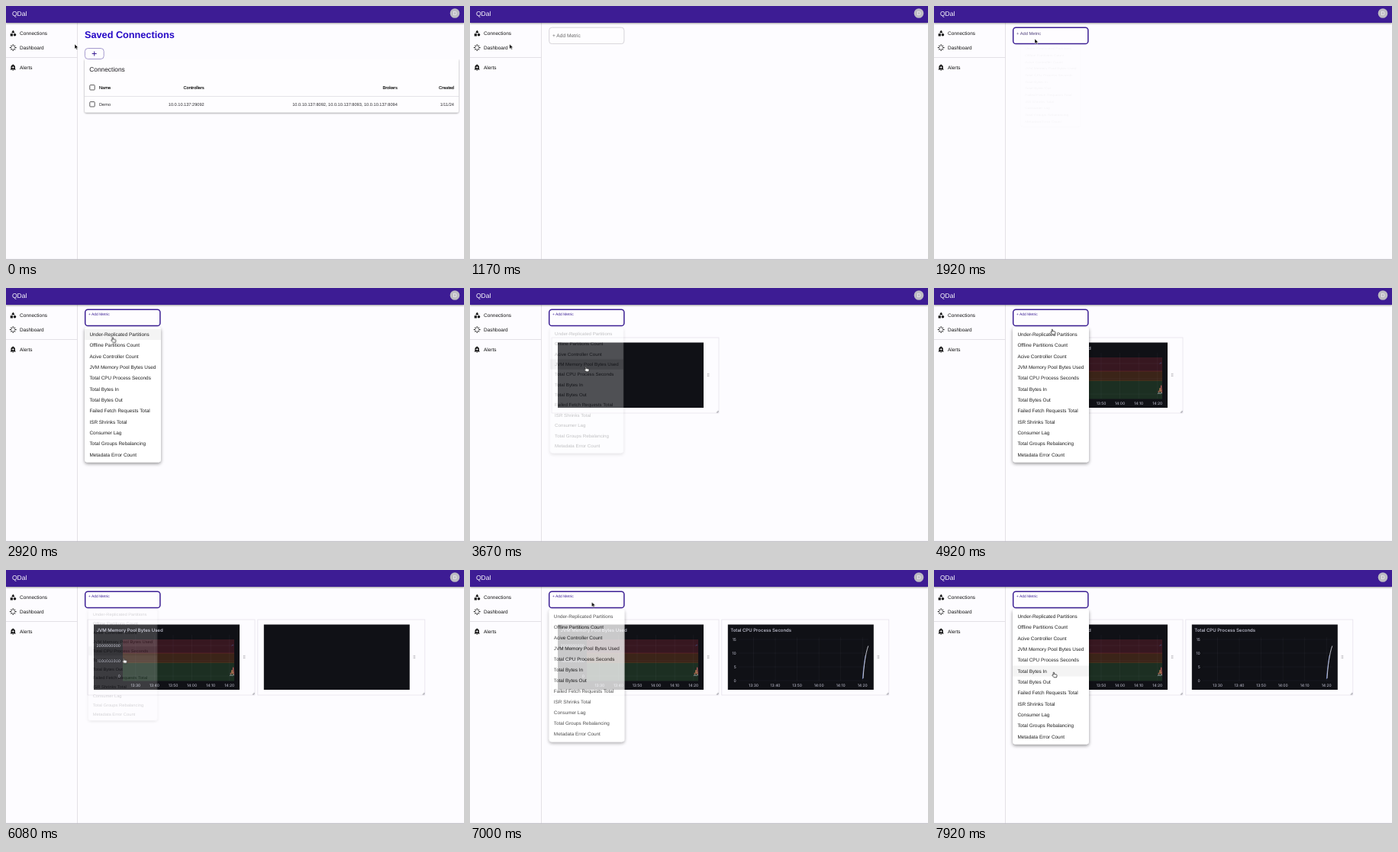
Write an HTML page that moves like this. It is 600 px wide and 333 px high and loops after 8000 ms.

```html
<!DOCTYPE html>
<html lang="en">
<head>
<meta charset="utf-8">
<title>Broker dashboard</title>
<style>
html, body { margin: 0; width: 100%; height: 100%; overflow: hidden; background: #fdfcff; }
svg { display: block; width: 600px; height: 333px; font-family: "Liberation Sans", Arial, sans-serif; text-rendering: geometricPrecision; }
.end { text-anchor: end; }
.mid { text-anchor: middle; }
.chart { font-family: Inter, sans-serif; font-size: 5px; fill: #ccccdc; }
.chart .title { font-size: 6px; font-weight: 500; }

/* One 8 s loop: 1% = 80 ms */
.home, .board, .panel, .plot, .hover, .hand, .arrow { animation: 8s step-end infinite; }
.home { animation-name: leave; }
.board { animation-name: enter; }
.focus { animation: focus 8s step-end infinite; }
.label { animation: shrink 8s cubic-bezier(0, 0, .2, 1) infinite; }
.fade { animation: fade 8s cubic-bezier(.4, 0, .2, 1) infinite; }
.grow { animation: grow 8s cubic-bezier(.4, 0, .2, 1) infinite; transform-origin: 153px 48px; }
.hover { animation-name: hover; }
.cursor { animation: move 8s linear infinite; }
.hand { animation-name: hand; }
.arrow { animation-name: arrow; }
#panel1 { animation-name: panel1; }
#panel1 .plot { animation-name: plot1; }
#panel2 { animation-name: panel2; }
#panel2 .plot { animation-name: plot2; }

@keyframes leave { 0% { opacity: 1 } 12.5%, 100% { opacity: 0 } }
@keyframes enter { 0% { opacity: 0 } 12.5%, 100% { opacity: 1 } }
@keyframes panel1 { 0% { opacity: 0 } 44.6%, 100% { opacity: 1 } }
@keyframes plot1 { 0% { opacity: 0 } 52.1%, 100% { opacity: 1 } }
@keyframes panel2 { 0% { opacity: 0 } 74.4%, 100% { opacity: 1 } }
@keyframes plot2 { 0% { opacity: 0 } 82.5%, 100% { opacity: 1 } }
@keyframes focus {
  0% { stroke: #c4c2c9; stroke-width: .7px }
  23.4%, 100% { stroke: #3c1f94; stroke-width: 1.5px }
}
@keyframes shrink {
  0%, 23.5% { transform: translate(108px, 41px); fill: #666 }
  26%, 100% { transform: translate(108px, 35.8px) scale(.75); fill: #3c1f94 }
}
@keyframes fade {
  0%, 23.6%, 47.7%, 54.6%, 77.6%, 85.8% { opacity: 0 }
  27%, 44.3%, 58%, 74.2%, 89.2%, 100% { opacity: 1 }
}
@keyframes grow {
  0%, 23.6%, 47.7%, 54.6%, 77.6%, 85.8% { transform: scale(.75, .5625) }
  25.9%, 45.4%, 56.9%, 75.3%, 88.1%, 100% { transform: none }
}
@keyframes hover {
  0%, 48%, 78% { fill-opacity: 0; transform: none }
  34.7%, 61.6%, 93.2% { fill-opacity: .045; transform: none }
  37.1%, 63.7%, 94.2% { fill-opacity: .045; transform: translateY(14.32px) }
  39.4%, 65.8%, 95.3% { fill-opacity: .045; transform: translateY(28.64px) }
  41.7%, 68%, 96.3% { fill-opacity: .045; transform: translateY(42.96px) }
  44.3% { fill-opacity: .16; transform: translateY(42.96px) }
  70.2%, 97.3% { fill-opacity: .045; transform: translateY(57.28px) }
  74.2% { fill-opacity: .16; transform: translateY(57.28px) }
  98.4%, 100% { fill-opacity: .045; transform: translateY(71.6px) }
}
@keyframes move {
  0%, .9% { transform: translate(90px, 50px) }
  5.2%, 12.4% { transform: translate(27px, 52px) }
  21.9%, 33% { transform: translate(132px, 43px) }
  42.75%, 46.9% { transform: translate(151px, 103px) }
  53%, 60.5% { transform: translate(155px, 43px) }
  61.5% { transform: translate(154px, 54px) }
  70.9%, 77.3% { transform: translate(153.5px, 115.5px) }
  84%, 92.3% { transform: translate(159.5px, 42px) }
  99%, 100% { transform: translate(156px, 134px) }
}
@keyframes hand {
  0%, 14.5%, 47.6%, 78% { opacity: 0 }
  8.3%, 34.8%, 61.2%, 93.2%, 100% { opacity: 1 }
}
@keyframes arrow {
  0%, 14.5%, 47.6%, 78% { opacity: 1 }
  8.3%, 34.8%, 61.2%, 93.2%, 100% { opacity: 0 }
}
</style>
</head>
<body>
<svg viewBox="0 0 600 333">
  <defs>
    <filter id="soft" x="-20%" y="-20%" width="140%" height="150%">
      <feDropShadow dx="0" dy="1" stdDeviation="1" flood-opacity=".4"/>
    </filter>
    <filter id="deep" x="-20%" y="-20%" width="140%" height="140%">
      <feDropShadow dx="0" dy="2" stdDeviation="2.2" flood-opacity=".42"/>
    </filter>
  </defs>
  <rect width="600" height="333" fill="#fdfcff"/>

  <g class="home">
    <text x="103" y="42.2" font-size="12.7" font-weight="700" fill="#2508c6">Saved Connections</text>
    <rect x="103" y="69" width="490" height="70.5" rx="2" fill="#fefdff" filter="url(#soft)"/>
    <rect x="102" y="54" width="492" height="16" fill="#fdfcff"/>
    <rect x="103.4" y="55.5" width="24.8" height="14" rx="4" fill="#fefdff" stroke="#8f82c2" stroke-width=".8"/>
    <path d="M112.7 62.5h6M115.7 59.5v6" stroke="#3c1f94" stroke-width="1"/>
    <text x="109.2" y="85.8" font-size="8.4" fill="#1d1b20">Connections</text>
    <path d="M103 118.5H593" stroke="#dfdde3" stroke-width=".8"/>
    <g fill="none" stroke="#4a4a4a" stroke-width=".9">
      <rect x="109.8" y="103.6" width="6.4" height="6.4" rx=".8"/>
      <rect x="109.8" y="125.6" width="6.4" height="6.4" rx=".8"/>
    </g>
    <g id="table" font-size="5.63"></g>
  </g>

  <g class="board">
    <g id="panel1" class="panel">
      <g class="frame"></g>
      <g class="plot chart">
        <text class="title" x="118.5" y="80.7">JVM Memory Pool Bytes Used</text>
        <rect x="153" y="91" width="146" height="18" fill="#371720"/>
        <rect x="153" y="109" width="146" height="12.5" fill="#3b2418"/>
        <rect x="153" y="121.5" width="146" height="24" fill="#1c2f22"/>
        <path d="M153 109h146" stroke="#8a2b35" stroke-width=".4"/>
        <path d="M153 121.5h146" stroke="#7a4a20" stroke-width=".4"/>
        <g class="ticks"></g>
        <g fill="none" stroke-width=".7">
          <path d="M293 138.3l2-.6 1.4.8 1.2-1 1.4.4" stroke="#d9dbe6"/>
          <path d="M293.4 135.8l2.3-.8 1.2-1 .8-6.3 .9 9.3" stroke="#e0606c"/>
          <path d="M294.5 137l1.6-6 .8 5.5 1-3" stroke="#c98a5a"/>
          <path d="M295.5 99.2l2.5-1.2" stroke="#3f5390"/>
        </g>
      </g>
    </g>
    <g id="panel2" class="panel">
      <g class="frame" transform="translate(222.8)"></g>
      <g class="plot chart">
        <text class="title" x="341.3" y="80.7">Total CPU Process Seconds</text>
        <g class="ticks"></g>
        <path d="M514.3 143C515.2 132 516.4 121 518.2 112" fill="none" stroke="#5468ad" stroke-width="1"/>
        <path d="M515 142C516 126 518 110 521.7 99.5" fill="none" stroke="#d4d5de" stroke-width=".9"/>
      </g>
    </g>
    <rect class="focus" x="103.7" y="28.2" width="98.2" height="21.4" rx="3.6" fill="#fefdff"/>
    <text class="label" font-size="6.6">+ Add Metric</text>
    <g class="fade"><g class="grow">
      <rect x="103" y="51" width="100" height="177.6" rx="4" fill="#fff" filter="url(#deep)"/>
      <rect class="hover" x="103" y="53.7" width="100" height="14.3"/>
      <g id="menu" font-size="6.42" fill="#1f1f1f"></g>
    </g></g>
  </g>

  <path d="M93.5 22V332" stroke="#dcdae0" stroke-width=".8"/>
  <path d="M0 67.5H93" stroke="#dcdae0" stroke-width=".8"/>
  <g id="nav" font-size="6.48" fill="#111"></g>
  <path transform="translate(4.5 30.8) scale(.4)" fill="#111" d="M12 2l-5.5 9h11zM3 13.5h8v8H3zM13 17.5a4.5 4.5 0 1 0 9 0a4.5 4.5 0 1 0-9 0"/>
  <g id="rays" transform="translate(9.2 54.6)" stroke="#111" stroke-width="1.05"></g>
  <path transform="translate(4.4 75.6) scale(.4)" fill="#111" d="M10 21a2 2 0 0 0 4 0zM18.9 16.8V11c0-3.2-2.3-6-5.3-6.7v-.7a1.6 1.6 0 0 0-3.2 0v.7C7.4 5 5.1 7.8 5.1 11v5.8L3 18.9V20h18v-1.1zM16 13h-3v3h-2v-3H8v-2h3V8h2v3h3z"/>

  <rect width="600" height="22" fill="#3c1f94" filter="url(#soft)"/>
  <text x="8" y="13" font-size="8.5" fill="#fff">QDal</text>
  <circle cx="588" cy="9.5" r="6.3" fill="#bdbcc2"/>
  <text class="mid" x="588" y="12.1" font-size="7.2" fill="#f7f5fb">D</text>
  <rect y="331.8" width="600" height="1.2" fill="#c3c1c7"/>

  <g class="cursor">
    <path class="arrow" d="M0 0V6.3L1.5 5L2.5 7.2L3.6 6.7L2.6 4.6H4.6Z" fill="#000" stroke="#fff" stroke-width=".5"/>
    <path class="hand" d="M.2 .8C.2-.2 1.6-.2 1.6 .8V2.6L4.4 3.1Q5.2 3.3 5.1 4.2L4.6 6.8H1.2L-1 4.4C-1.5 3.6-.6 3.1 .2 3.9Z" fill="#fff" stroke="#111" stroke-width=".7"/>
  </g>
</svg>

<script>
const $ = s => document.querySelector(s);
const text = (x, y, s, attrs = "") => `<text x="${x}" y="${y}" ${attrs}>${s}</text>`;

$("#nav").innerHTML = [["Connections", 37.9], ["Dashboard", 57], ["Alerts", 82.8]]
  .map(([s, y]) => text(18, y, s)).join("");

$("#rays").innerHTML = Array.from({ length: 8 }, (_, i) =>
  `<path d="M${i % 2 ? 2.1 : 2} 0H${i % 2 ? 3.9 : 4.4}" transform="rotate(${i * 45})"/>`).join("");

const columns = [
  [122, "", "Name", "Demo"],
  [259.7, "end", "Controllers", "10.0.10.137:29092"],
  [512.8, "end", "Brokers", "10.0.10.137:8092, 10.0.10.137:8093, 10.0.10.137:8094"],
  [587, "end", "Created", "1/11/24"]
];
$("#table").innerHTML = columns.map(([x, align, head, cell]) =>
  text(x, 109, head, `class="${align}" fill="#000" stroke="#000" stroke-width=".12"`) +
  text(x, 131, cell, `class="${align}" fill="#2b2a2e"`)).join("");

const metrics = ["Under-Replicated Partitions", "Offline Partitions Count", "Acive Controller Count",
  "JVM Memory Pool Bytes Used", "Total CPU Process Seconds", "Total Bytes In", "Total Bytes Out",
  "Failed Fetch Requests Total", "ISR Shrinks Total", "Consumer Lag", "Total Groups Rebalancing",
  "Metadata Error Count"];
$("#menu").innerHTML = metrics.map((s, i) => text(109.4, 63.1 + 14.32 * i, s)).join("");

const dots = [0, 1, 2].map(i => `<path d="M310.9 ${112.4 + i * 1.6}h.8m.8 0h.8"/>`).join("");
const frame = `
  <rect x="107" y="65" width="219" height="99" fill="#fdfcff" stroke="#e3dfe9" stroke-width=".7"/>
  <rect x="115" y="71.5" width="191" height="85.5" fill="#101116"/>
  <g stroke="#8a8890" stroke-width=".8">${dots}<path d="M322.8 163h2.2v-2.2" fill="none"/></g>`;
document.querySelectorAll(".frame").forEach(g => g.innerHTML = frame);

const times = ["13:30", "13:40", "13:50", "14:00", "14:10", "14:20"];
function ticks(id, { x0, dx, left, right, top, bottom, values }) {
  const grid = d => `<path d="${d}" stroke="#ccccdc" stroke-opacity=".09" stroke-width=".5"/>`;
  const xs = times.map((s, i) => {
    const x = x0 + dx * i;
    return grid(`M${x} ${top}V${bottom}`) + text(x, 152.8, s, 'class="mid"');
  });
  const ys = values.map(([s, y]) =>
    grid(`M${left} ${y}H${right}`) + text(left - 3, y + 1.8, s, 'class="end"'));
  $(`#${id} .ticks`).innerHTML = xs.concat(ys).join("");
}
ticks("panel1", { x0: 169.8, dx: 24.6, left: 153, right: 299, top: 85, bottom: 145.5,
  values: [["2000000000", 99], ["1000000000", 119], ["0", 139]] });
ticks("panel2", { x0: 371.5, dx: 28.55, left: 351.7, right: 522, top: 88, bottom: 145.5,
  values: [["15", 91], ["10", 109], ["5", 127], ["0", 145]] });
</script>
</body>
</html>
```
